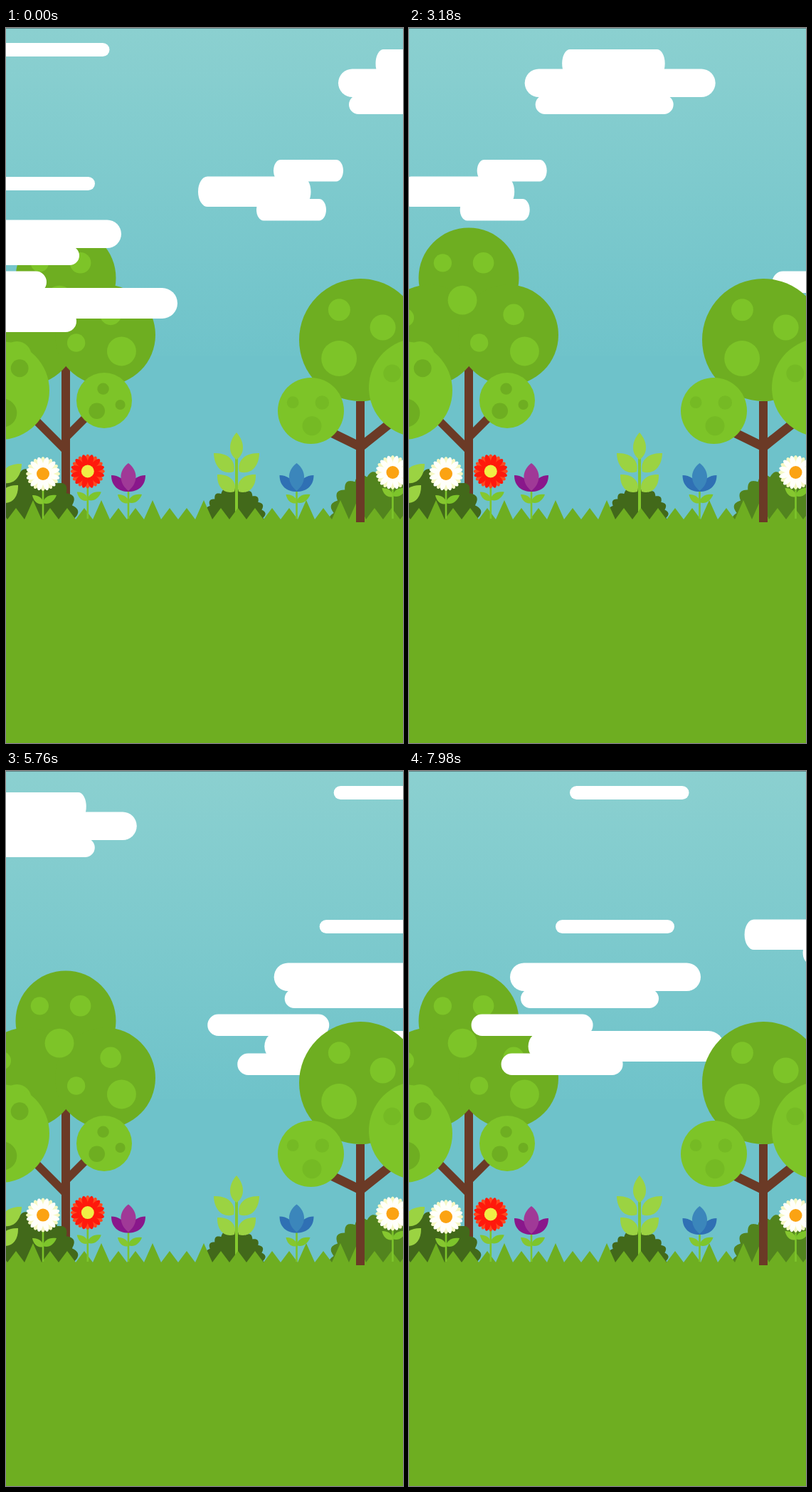
Animation, 558 px wide and 1004 px high, one loop 8000 ms. Source, as an HTML page:

```html
<!DOCTYPE html>
<html lang="en">
<head>
<meta charset="utf-8">
<title>Garden</title>
<style>
html, body { margin: 0; width: 100%; height: 100%; overflow: hidden; background: #6eae21; }
svg { display: block; width: 558px; height: 1004px; }
</style>
</head>
<body>
<svg id="stage" viewBox="0 0 558 1004">
  <defs>
    <linearGradient id="sky" x2="0" y2="1">
      <stop offset="0" stop-color="#8bd0d0"/>
      <stop offset="1" stop-color="#6fc3ca"/>
    </linearGradient>
  </defs>
  <rect width="558" height="700" fill="#6ec2ca"/>
  <rect width="558" height="460" fill="url(#sky)"/>
  <g id="leftTree"></g>
  <g id="clouds" fill="#fff"></g>
  <g id="rightTree"></g>
  <g id="bushes"></g>
  <g id="plants"></g>
  <path id="grass" fill="#6eae21"/>
  <path d="M498 524V694" stroke="#6b3a26" stroke-width="12"/>
  <g id="flowers"></g>
  <rect width="558" height="1" fill="#5f8586"/>
</svg>
<script>
const LOOP = 8000, LEAF = '#6eae21', LIGHT = '#7dc428', BARK = '#6b3a26';
const $ = id => document.getElementById(id);

function add(parent, tag, attrs) {
  const el = document.createElementNS('http://www.w3.org/2000/svg', tag);
  for (const k in attrs) el.setAttribute(k, attrs[k]);
  return parent.appendChild(el);
}
const path = (g, d, fill) => add(g, 'path', { d, fill });
const line = (g, d, stroke, width) =>
  add(g, 'path', { d, stroke, fill: 'none', 'stroke-width': width });
const disc = (g, cx, cy, r, fill) => add(g, 'circle', { cx, cy, r, fill });
const polar = (cx, cy, r, a) => [cx + r * Math.cos(a), cy + r * Math.sin(a)];

// Crown: a disc with spots fanned out from one angle
const SPOTS = [{ far: .46, size: .29 }, { far: .6, size: .18 }, { far: .42, size: .21 }];
function crown(g, x, y, r, fill) {
  disc(g, x, y, r, fill);
  return (color, turn, step, count = 3) => SPOTS.slice(0, count).forEach(({ far, size }, i) =>
    disc(g, ...polar(x, y, far * r, (turn + i * step) * Math.PI / 180), size * r, color));
}

const lt = $('leftTree');
line(lt, 'M30 539L84 593M84 575L116 543', BARK, 11.5);
line(lt, 'M84 460V680', BARK, 12);
const [top3, left3, right3] = [[84, 351], [29, 431], [139.5, 431]].map(p => crown(lt, ...p, 70.5, LEAF));
top3(LIGHT, 106, 104);
left3(LIGHT, 115, 100, 2);
right3(LIGHT, 45, 120);
crown(lt, -8, 509, 69, LIGHT)(LEAF, 84, -133, 2);
crown(lt, 138, 523, 39, LIGHT)(LEAF, 125, -110);

const rt = $('rightTree');
line(rt, 'M455 567L498 588M498 588.500L540 555', BARK, 13);
crown(rt, 498, 438, 86, LEAF)(LIGHT, 139, 96);
crown(rt, 428.5, 537.5, 46.5, LIGHT)('#75ba24', 86, 119);
crown(rt, 579, 505, 69, LIGHT)('#75ba24', 90, 119);

// Bush with a scalloped rim
function bush(cx, cy, r, fill) {
  const rim = [];
  for (let i = 0; i < 420; i++) {
    const a = Math.PI * 2 * i / 420;
    const bump = Math.abs(Math.cos((a - Math.PI) * 10.5));
    rim.push(polar(cx, cy, r * (.91 + .09 * bump), a).map(v => v.toFixed(1)));
  }
  path($('bushes'), `M${rim.join('L')}Z`, fill);
}
bush(32, 689, 70, '#42691a');
bush(322, 688, 43, '#42691a');
bush(521, 690, 67, '#52841e');

// Pointed leaf from its base to its tip; w is the bulge on either side
function leaf(g, bx, by, tx, ty, w, fill) {
  const dx = tx - bx, dy = ty - by, l = Math.hypot(dx, dy);
  const at = (f, s) => [bx + dx * f - dy / l * w * s, by + dy * f + dx / l * w * s];
  path(g, `M${bx} ${by}C${at(.2, 1)} ${at(.65, 1)} ${tx} ${ty}C${at(.65, -1)} ${at(.2, -1)} ${bx} ${by}Z`, fill);
}

function plant(x, y) {
  const g = add($('plants'), 'g', { transform: `translate(${x} ${y})` });
  line(g, 'M0 600V690', '#84c92f', 4);
  leaf(g, 0, 606, 0, 568, 12, '#9bd342');
  for (const s of [-1, 1]) {
    leaf(g, 4 * s, 623, 32 * s, 597, 14, '#9bd342');
    leaf(g, 3 * s, 651, 27 * s, 627, 13, '#9bd342');
  }
}
plant(324, 0);
plant(-10, 15);

// Grass edge: even teeth, a few of them taller
const tall = [38, 134, 206, 278, 422, 470, 494];
let edge = 'M-22 1004V690';
for (let x = -10; x < 580; x += 24) edge += `L${x} ${tall.includes(x) ? 663 : 674}L${x + 12} 690`;
$('grass').setAttribute('d', edge + 'V1004Z');

// Flowers: fixed stem, bobbing head
const heads = [];
function flower(x, y, base) {
  const g = $('flowers');
  line(g, `M${x} ${y + 12}V689`, '#7dc52b', 2.6);
  leaf(g, x, base, x - 15, base - 12, 6, '#86c72f');
  leaf(g, x, base - 1, x + 19, base - 12, 6.5, '#7dc52b');
  const head = add(g, 'g', {});
  heads.push(head);
  return add(head, 'g', { transform: `translate(${x} ${y})` });
}

function daisy(x, y, base, back, front, core) {
  const g = flower(x, y, base);
  [back, front].forEach((fill, turn) => {
    for (let i = 0; i < 12; i++)
      add(g, 'ellipse', { cy: -15, rx: 3.8, ry: 9, fill, transform: `rotate(${i * 30 + turn * 15})` });
  });
  disc(g, 0, 0, 9, core);
}
const whiteDaisy = (x, y, base) => daisy(x, y, base, '#f6f8c4', '#fffffa', '#fba313');

function tulip(x, side, mid) {
  const g = flower(x, 630, 667);
  path(g, 'M-24 -2C-14 -2 -5 4 0 14C5 4 14 -2 24 -2C24 13 14 21 0 21C-14 21 -24 13 -24 -2Z', side);
  path(g, 'M0 -19C7 -14 11 -6 10.500 1C10 9 6 15 0 20C-6 15 -10 9 -10.500 1C-11 -6 -7 -14 0 -19Z', mid);
}

whiteDaisy(52, 626, 668);
daisy(114.8, 622.5, 663.5, '#ff4a20', '#ff190c', '#f0ee45');
tulip(172, '#89178b', '#a03997');
tulip(408.5, '#2f70b4', '#3b86bb');
whiteDaisy(543.5, 624, 658);

// Clouds: bars of x, y, width, height; round is the corner width over the height
const clouds = [];
const bar = (x, y, width, height, round = .5) =>
  ({ x, y, width, height, rx: height * round, ry: height / 2 });
function cloud(start, speed, bars) {
  const el = add($('clouds'), 'g', {});
  for (const b of bars) add(el, 'rect', b);
  clouds.push({ el, start, speed });
}
const bank = y => [bar(0, y, 268, 39.5), bar(15, y + 36.5, 194, 27)];
const heap = [bar(52.5, 30, 144.5, 40, .28), ...bank(57.5)];
const puff = [bar(106, 185, 98, 30.5, .33), bar(0, 208.5, 158.5, 42.5, .31), bar(82, 240, 98, 30.5, .33)];
const streaks = [bar(84, 21, 167.5, 19), bar(64, 209, 167, 19), ...bank(269.5)];
const stack = [bar(0, 341.5, 171, 30.5), bar(80, 365, 275, 43), bar(42, 396.5, 171, 30.5)];

const SLOW = 88.15, FAST = 95.7, LAP = 905;
cloud(467, FAST, heap);
cloud(-106, FAST, streaks);
cloud(985.5, 105.7, streaks);
for (const lap of [0, LAP]) {
  cloud(270 + lap, SLOW, puff);
  cloud(-114 + lap, SLOW, stack);
}

// One soft hop in the first half of every 0.9 s
function hop(s) {
  const p = s % .9;
  return p < .45 ? -7 * Math.sin(Math.PI * p / .45) ** 2 : 0;
}

function draw(now) {
  const s = now % LOOP / 1000, y = hop(s).toFixed(2);
  for (const c of clouds)
    c.el.setAttribute('transform', `translate(${(c.start - c.speed * s).toFixed(2)} 0)`);
  for (const h of heads) h.setAttribute('transform', `translate(0 ${y})`);
}
let t0;
function tick(now) {
  t0 ??= now;
  draw(now - t0);
  requestAnimationFrame(tick);
}
draw(0);
requestAnimationFrame(tick);
</script>
</body>
</html>
```
